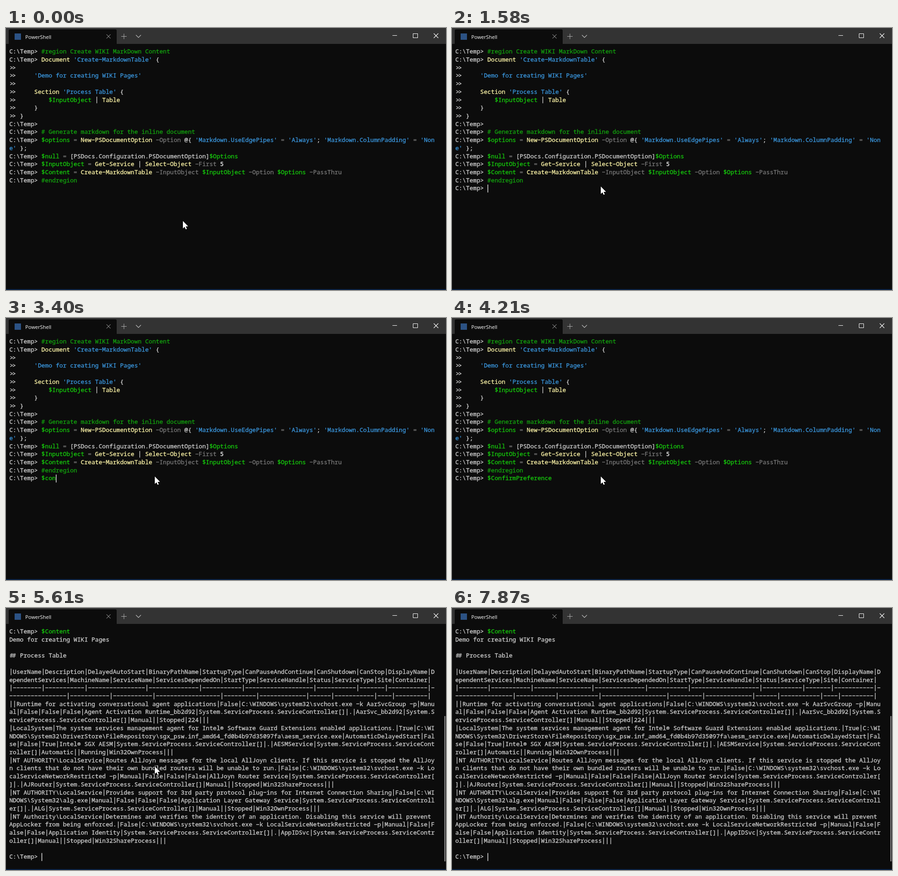
An HTML page with a canvas for the animation above (8 s loop, 970 by 577 pixels).

```html
<!DOCTYPE html>
<html lang="en">
<head>
<meta charset="utf-8">
<title>Terminal session</title>
<style>
  html, body { margin: 0; width: 100%; height: 100%; overflow: hidden; background: #0c0c0c; }
  canvas { display: block; }
</style>
</head>
<body>
<canvas id="stage" width="970" height="577"></canvas>
<script>
const ctx = document.getElementById('stage').getContext('2d');
const LOOP = 8000, COLS = 119;
const LEFT = 7.2, TOP = 43, CELL = 7.88, PITCH = 17.72, BASE = 13.2;
const PLAIN = '#cccccc';
const PROMPT = 'C:\\Temp> ';

const RULES = [
  ['#13a10e', /#.*/],
  ['#3a96dd', /'[^']*'/],
  ['#16c60c', /\$\w+/],
  ['#f9f1a5', /\b(?:Document|Section|Table|New-PSDocumentOption|Get-Service|Select-Object|Create-MarkdownTable)\b/],
  ['#767676', /-[A-Z]\w+|=/],
  ['#f2f2f2', /\b5\b/]
];
const SYNTAX = new RegExp(RULES.map(r => `(${r[1].source})`).join('|'), 'g');

const SCRIPT = [
  PROMPT + '#region Create WIKI MarkDown Content',
  PROMPT + "Document 'Create-MarkdownTable' {",
  '>>',
  ">>     'Demo for creating WIKI Pages'",
  '>>',
  ">>     Section 'Process Table' {",
  '>>         $InputObject | Table',
  '>>     }',
  '>> }',
  PROMPT,
  PROMPT + '# Generate markdown for the inline document',
  PROMPT + "$options = New-PSDocumentOption -Option @{ 'Markdown.UseEdgePipes' = 'Always'; 'Markdown.ColumnPadding' = 'None' };",
  PROMPT + '$null = [PSDocs.Configuration.PSDocumentOption]$Options',
  PROMPT + '$InputObject = Get-Service | Select-Object -First 5',
  PROMPT + '$Content = Create-MarkdownTable -InputObject $InputObject -Option $Options -PassThru',
  PROMPT + '#endregion'
];

const FIELDS = ('UserName Description DelayedAutoStart BinaryPathName StartupType CanPauseAndContinue ' +
  'CanShutdown CanStop DisplayName DependentServices MachineName ServiceName ServicesDependedOn ' +
  'StartType ServiceHandle Status ServiceType Site Container').split(' ');
const tableRow = cells => `|${cells.join('|')}|`;
const CTRL = 'System.ServiceProcess.ServiceController[]';
const SVCHOST = 'C:\\WINDOWS\\system32\\svchost.exe -k ';
const OUTPUT = [
  'Demo for creating WIKI Pages',
  '',
  '## Process Table',
  '',
  tableRow(FIELDS),
  tableRow(FIELDS.map(f => '-'.repeat(f.length))),
  `||Runtime for activating conversational agent applications|False|${SVCHOST}AarSvcGroup -p|Manual|False|False|False|Agent Activation Runtime_bb2d92|${CTRL}|.|AarSvc_bb2d92|${CTRL}|Manual||Stopped|224|||`,
  `|LocalSystem|The system services management agent for Intel® Software Guard Extensions enabled applications.|True|C:\\WINDOWS\\System32\\DriverStore\\FileRepository\\sgx_psw.inf_amd64_fd0b4b97d35097fa\\aesm_service.exe|AutomaticDelayedStart|False|False|True|Intel® SGX AESM|${CTRL}|.|AESMService|${CTRL}|Automatic||Running|Win32OwnProcess|||`,
  `|NT AUTHORITY\\LocalService|Routes AllJoyn messages for the local AllJoyn clients. If this service is stopped the AllJoyn clients that do not have their own bundled routers will be unable to run.|False|${SVCHOST}LocalServiceNetworkRestricted -p|Manual|False|False|False|AllJoyn Router Service|${CTRL}|.|AJRouter|${CTRL}|Manual||Stopped|Win32ShareProcess|||`,
  `|NT AUTHORITY\\LocalService|Provides support for 3rd party protocol plug-ins for Internet Connection Sharing|False|C:\\WINDOWS\\System32\\alg.exe|Manual|False|False|False|Application Layer Gateway Service|${CTRL}|.|ALG|${CTRL}|Manual||Stopped|Win32OwnProcess|||`,
  `|NT Authority\\LocalService|Determines and verifies the identity of an application. Disabling this service will prevent AppLocker from being enforced.|False|${SVCHOST}LocalServiceNetworkRestricted -p|Manual|False|False|False|Application Identity|${CTRL}|.|AppIDSvc|${CTRL}|Manual||Stopped|Win32ShareProcess|||`,
  ''
];

// Each step changes part of the state and holds until the next one.
const STEPS = [
  [0, { cmd: null, row: 16, col: 19, caret: false, mouse: [390, 425], done: false }],
  [200, { mouse: [379, 411] }],
  [390, { mouse: [358, 387] }],
  [580, { mouse: [337, 361], caret: true }],
  [760, { mouse: [328, 349] }],
  [1160, { caret: false }],
  [1370, { row: 17, col: 0, caret: true }],
  [1580, { cmd: '', col: 9 }],
  [1980, { caret: false }],
  [2390, { caret: true }],
  [2780, { cmd: '$', col: 10 }],
  [3220, { cmd: '$co', col: 12 }],
  [3400, { cmd: '$con', col: 13 }],
  [4000, { cmd: '$ConfirmPreference', col: 27 }],
  [4210, { caret: false }],
  [4620, { cmd: '$Content', col: 17, caret: true }],
  [5220, { caret: false }],
  [5410, { row: 18, col: 0, caret: true }],
  [5610, { done: true, row: 28, col: 9 }],
  [6030, { caret: false }],
  [6460, { caret: true, mouse: [560, 268] }],
  [6620, { mouse: [717, 201] }],
  [6850, { mouse: [930, 280] }],
  [7050, { mouse: null, caret: false }],
  [7640, { mouse: [963, 393], caret: true }],
  [7870, { mouse: null }]
];
const states = [];
STEPS.forEach(([, change], i) => states.push({ ...states[i - 1], ...change }));

function box(color, x, y, w, h) {
  ctx.fillStyle = color;
  ctx.fillRect(x, y, w, h);
}

function stroke(color, width, ...lines) {
  ctx.strokeStyle = color;
  ctx.lineWidth = width;
  ctx.beginPath();
  for (const pts of lines) pts.forEach(([x, y], i) => i ? ctx.lineTo(x, y) : ctx.moveTo(x, y));
  ctx.stroke();
}

const cross = (x, y, r) => [[[x - r, y - r], [x + r, y + r]], [[x - r, y + r], [x + r, y - r]]];

function drawFrame() {
  box('#0c0c0c', 0, 0, 970, 577);
  box('#333333', 0, 0, 970, 35);
  ctx.fillStyle = '#0c0c0c';
  ctx.beginPath();
  ctx.roundRect(6, 3, 238, 32, [3, 3, 0, 0]);
  ctx.fill();
  box('#2c5284', 19, 12, 14, 14);
  ctx.font = '11.1px "Open Sans", "Noto Sans", sans-serif';
  ctx.fillStyle = '#ffffff';
  ctx.fillText('PowerShell', 42.5, 23.5);
  stroke('#b8b8b8', 1, ...cross(226, 18.5, 4.5));
  stroke('#b0b0b0', 1, [[254, 18.5], [266, 18.5]], [[260, 12.5], [260, 24.5]]);
  stroke('#c0c0c0', 1.1, [[286.5, 15.5], [292, 21], [297.5, 15.5]]);
  stroke('#ffffff', 1, [[852, 16.5], [862, 16.5]]);
  ctx.strokeRect(897.5, 12.5, 10, 9);
  stroke('#ffffff', 1.1, ...cross(948, 17, 5));
  box('#0a2348', 0, 575, 970, 2);
}

// Bars and dashes are drawn as rules, longer than the font's own.
function drawGlyph(ch, row, col, color, shift) {
  if (ch === ' ') return;
  const x = LEFT + col * CELL, y = TOP + row * PITCH + BASE;
  if (ch === '-') return box(color, x + 0.7, y - 5.3, CELL - 1.4, 1.4);
  if (ch === '|') return box(color, x + CELL / 2 - 0.7, y - 11.3, 1.4, 14.5);
  ctx.fillStyle = ctx.strokeStyle = color;
  ctx.fillText(ch, x + shift, y);
  ctx.strokeText(ch, x + shift, y);
}

// Doubled > and # sit closer together than their cells.
function pairShift(text, i) {
  const ch = text[i];
  if (ch !== '>' && ch !== '#') return 0;
  if (text[i + 1] === ch) return 1;
  return text[i - 1] === ch ? -1 : 0;
}

function colorsOf(text) {
  const colors = Array(text.length).fill(PLAIN);
  for (const m of text.matchAll(SYNTAX)) {
    const rule = RULES.findIndex((_, k) => m[k + 1] !== undefined);
    colors.fill(RULES[rule][0], m.index, m.index + m[0].length);
  }
  return colors;
}

// Draws one logical line, wrapped, and returns the next free row.
function drawLine(text, row, highlight) {
  const colors = highlight ? colorsOf(text) : null;
  for (let i = 0; i < text.length; i++) {
    drawGlyph(text[i], row + Math.floor(i / COLS), i % COLS, colors ? colors[i] : PLAIN, pairShift(text, i));
  }
  return row + Math.max(1, Math.ceil(text.length / COLS));
}

function drawPointer(x, y) {
  ctx.save();
  ctx.translate(x, y);
  ctx.beginPath();
  [[0, 0], [0, 16.4], [3.7, 13], [6.3, 18.4], [8.8, 17.3], [6.3, 12], [11.6, 11.8]]
    .forEach(p => ctx.lineTo(...p));
  ctx.closePath();
  ctx.strokeStyle = '#000000';
  ctx.lineWidth = 1.4;
  ctx.stroke();
  ctx.fillStyle = '#ffffff';
  ctx.fill();
  ctx.restore();
}

function draw(s) {
  drawFrame();
  ctx.font = `${CELL / 0.6}px "Noto Sans Mono", "DejaVu Sans Mono", monospace`;
  ctx.lineWidth = 0.35;
  ctx.lineJoin = 'round';
  let row = 0;
  if (s.done) {
    row = drawLine(PROMPT + s.cmd, row, true);
    for (const line of OUTPUT) row = drawLine(line, row, false);
    drawLine(PROMPT, row, false);
    box('#9c9c9c', 966.5, 238, 2, 320);
  } else {
    for (const line of SCRIPT) row = drawLine(line, row, true);
    if (s.cmd !== null) drawLine(PROMPT + s.cmd, row, true);
  }
  if (s.caret) box('#ffffff', LEFT + s.col * CELL + 0.3, TOP + s.row * PITCH + 0.5, 1.3, 17.5);
  if (s.mouse) drawPointer(...s.mouse);
}

let shown = -1;
const start = performance.now();
function tick() {
  const t = (performance.now() - start) % LOOP;
  const step = STEPS.findLastIndex(([at]) => at <= t);
  if (step !== shown) draw(states[shown = step]);
  requestAnimationFrame(tick);
}
tick();
</script>
</body>
</html>
```
